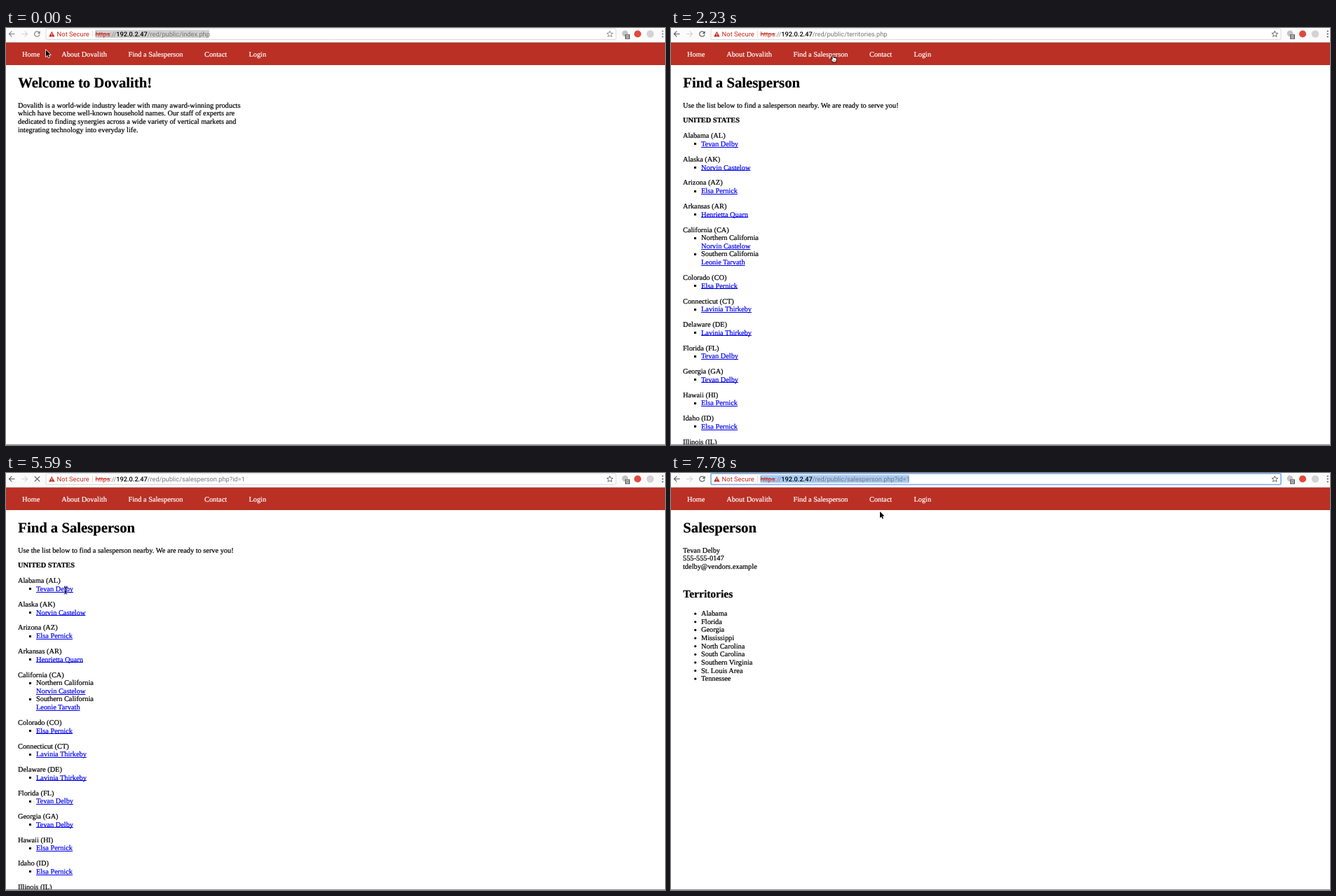
Write an HTML page with a canvas that moves like this. It is 940x596 px and loops after 7.99 s.

```html
<!DOCTYPE html>
<html lang="en">
<head>
<meta charset="utf-8">
<title>Sales directory</title>
<style>
  html, body { margin: 0; width: 100%; height: 100%; overflow: hidden; background: #fff; }
  canvas { display: block; }
</style>
</head>
<body>
<canvas id="stage" width="940" height="596"></canvas>
<script>
const ctx = document.getElementById('stage').getContext('2d');
const LOOP = 7990, LINE = 11.62, EM = 10.35, GAP = 10.3;
const SERIF = '"Liberation Serif", serif', SANS = 'Roboto, sans-serif';
const COMPANY = 'Dovalith', HOST = '192.0.2.47';
const [TEVAN, NORVIN, ELSA, HENRIETTA, LEONIE, LAVINIA] = ['Tevan Delby', 'Norvin Castelow',
  'Elsa Pernick', 'Henrietta Quarn', 'Leonie Tarvath', 'Lavinia Thirkeby'];

const STATES = [
  ['Alabama (AL)', TEVAN], ['Alaska (AK)', NORVIN], ['Arizona (AZ)', ELSA], ['Arkansas (AR)', HENRIETTA],
  ['California (CA)', ['Northern California', NORVIN], ['Southern California', LEONIE]],
  ['Colorado (CO)', ELSA], ['Connecticut (CT)', LAVINIA], ['Delaware (DE)', LAVINIA],
  ['Florida (FL)', TEVAN], ['Georgia (GA)', TEVAN], ['Hawaii (HI)', ELSA], ['Idaho (ID)', ELSA],
  ['Illinois (IL)']
];
const TERRITORIES = ['Alabama', 'Florida', 'Georgia', 'Mississippi', 'North Carolina', 'South Carolina',
  'Southern Virginia', 'St. Louis Area', 'Tennessee'];

// Each track holds its value until the next time.
const PAGES = [[0, drawHome], [2230, drawDirectory], [5860, drawPerson]];
const PATHS = [[0, 'index.php'], [1900, 'territories.php'], [5330, 'salesperson.php?id=1']];
const LOADING = [[0, false], [1900, true], [2230, false], [5330, true], [5860, false]];
const ADDRESS = [[0, 'inactive'], [1420, 'focused'], [1660, 'plain'], [7360, 'focused']];
const POINTER = [
  [0, arrow, 57, 31.5], [170, hand, 47, 38.5], [500, hand, 140, 35], [710, hand, 235, 43], [980, hand, 235, 38.5],
  [1420, hand, 231, 38.5], [2490, hand, 230, 38.5],
  [3030, hand, 240, 36], [3220, arrow, 272, 24], [3410, beam, 312, 8.5], [3600, beam, 306, 10], [3800, arrow, 299, 19],
  [4100, arrow, 190, 95], [4280, hand, 92, 167.5], [4490, hand, 90, 168], [4690, hand, 87, 168],
  [4890, hand, 86, 168], [5090, hand, 85, 168], [5590, beam, 85, 168],
  [6080, arrow, 150, 165], [6300, arrow, 240, 160], [6510, arrow, 330, 152], [6730, arrow, 371, 147],
  [7120, beam, 375, 11], [7570, arrow, 330, 35], [7780, arrow, 298, 55]
];
const at = (track, t) => track.findLast(key => key[0] <= t);

function text(string, x, y, { size = EM, color = '#000', weight = 400, family = SERIF } = {}) {
  ctx.font = `${weight} ${size}px ${family}`;
  ctx.fillStyle = ctx.strokeStyle = color;
  ctx.fillText(string, x, y);
  if (family === SERIF) { // slightly heavier page type
    ctx.lineWidth = 0.22;
    ctx.strokeText(string, x, y);
  }
  return ctx.measureText(string).width;
}
function rect(x, y, w, h, color) {
  ctx.fillStyle = color;
  ctx.fillRect(x, y, w, h);
}
function disc(x, y, r, color) {
  ctx.fillStyle = color;
  ctx.beginPath();
  ctx.arc(x, y, r, 0, 7);
  ctx.fill();
}
function stroke(path, color, width = 1) {
  ctx.strokeStyle = color;
  ctx.lineWidth = width;
  ctx.stroke(new Path2D(path));
}
function fill(path, color) {
  ctx.fillStyle = color;
  ctx.fill(new Path2D(path));
}

function lines(list, y) {
  list.forEach((line, i) => text(line, 17, y + i * LINE));
}
function heading(string, y = 85, size = EM * 2) {
  text(string, 17.3, y, { size, weight: 700 });
}
function link(name, y) {
  const color = '#0000ee', width = text(name, 43, y, { color });
  rect(43, Math.round(y + 0.7), width, 1, color);
}

function drawHome() {
  heading(`Welcome to ${COMPANY}!`);
  lines([`${COMPANY} is a world-wide industry leader with many award-winning products`,
    'which have become well-known household names. Our staff of experts are',
    'dedicated to finding synergies across a wide variety of vertical markets and',
    'integrating technology into everyday life.'], 113.7);
}

function drawDirectory() {
  heading('Find a Salesperson');
  lines(['Use the list below to find a salesperson nearby. We are ready to serve you!'], 113.7);
  text('UNITED STATES', 17, 135.4, { weight: 700 });
  let y = 157.4;
  for (const [state, ...entries] of STATES) {
    text(state, 17, y);
    for (const entry of entries) {
      y += LINE;
      rect(33, Math.round(y - 4.6), 3, 3, '#000');
      if (Array.isArray(entry)) {
        text(entry[0], 43, y);
        y += LINE;
        link(entry[1], y);
      } else link(entry, y);
    }
    y += LINE + GAP;
  }
}

function drawPerson() {
  heading('Salesperson');
  lines([TEVAN, '555-555-0147', 'tdelby@vendors.example'], 113.7);
  heading('Territories', 178, EM * 1.5);
  TERRITORIES.forEach((name, i) => {
    const y = 204.2 + i * LINE;
    disc(34.7, y - 3, 1.6, '#000');
    text(name, 43, y);
  });
}

function drawNav() {
  rect(0, 21, 940, 32, '#ba3025');
  [['Home', 23], [`About ${COMPANY}`, 79.2], ['Find a Salesperson', 174.4], ['Contact', 283], ['Login', 346.4]]
    .forEach(([label, x]) => text(label, x, 41, { color: '#fff' }));
}

function drawToolbar(mode, file, loading) {
  const icon = mode === 'inactive' ? '#808080' : '#5a5a5a', red = '#c5281c';
  rect(0, 0, 940, 20, '#fbfbfb');
  rect(0, 20, 940, 1, '#c4b0ae');
  stroke('M12.5 8.5H4.5M8.3 4.6L4.4 8.5L8.3 12.4', icon, 1.1);
  stroke('M22 8.5H30.5M26.7 4.6L30.6 8.5L26.7 12.4', '#d2d2d2', 1.1);
  if (loading) stroke('M40.8 4.8L48.2 12.2M48.2 4.8L40.8 12.2', icon, 1.2);
  else {
    stroke('M47.3 6.2A3.7 3.7 0 1 0 48 9.3', icon, 1.2);
    fill('M48.6 4.2V8.2H44.6Z', icon);
  }

  const focused = mode === 'focused';
  ctx.beginPath();
  ctx.roundRect(57, 0.8, 813, 15.7, 1.5);
  ctx.fillStyle = '#fff';
  ctx.fill();
  ctx.strokeStyle = focused ? '#78aaea' : '#d6d6d6';
  ctx.lineWidth = focused ? 1.6 : 0.9;
  ctx.stroke();

  fill('M65.3 4.8L69.5 12.6H61.1Z', red);
  rect(64.8, 7.4, 1, 2.6, '#fff');
  rect(64.8, 10.7, 1, 1, '#fff');
  text('Not Secure', 72.6, 12, { size: 9.4, color: red, family: SANS });
  rect(123.2, 3.5, 0.8, 10, '#d5d5d5');
  drawAddress(mode, file, red);

  const star = Array.from({ length: 10 }, (_, i) => {
    const r = i % 2 ? 2 : 4.6, a = i * Math.PI / 5;
    return `${861.3 + r * Math.sin(a)} ${8.8 - r * Math.cos(a)}`;
  });
  stroke(`M${star.join('L')}Z`, icon, 0.9);

  disc(883, 7.8, 4.4, '#c4c4c4');
  rect(883, 9, 7, 7, '#777');
  text('0', 884.5, 15, { size: 7, color: '#fff', family: SANS });
  disc(901, 8.5, 5, '#e2493d');
  disc(919, 8.5, 5.2, '#d3d3d3');
  [4.5, 8.5, 12.5].forEach(y => disc(936.7, y, 1.1, icon));
}

function drawAddress(mode, file, red) {
  const size = 9.23, left = 127.4, gray = '#777';
  const parts = [['https', red], ['://', gray], [HOST, '#000', 500], [`/red/public/${file}`, gray]];
  if (mode !== 'plain') {
    ctx.font = `${size}px ${SANS}`;
    const width = ctx.measureText(parts.map(part => part[0]).join('')).width;
    rect(left, 2.8, width, 11.4, mode === 'focused' ? '#a9cdf7' : '#d0d0d0');
  }
  let x = left;
  for (const [string, color, weight] of parts) {
    const width = text(string, x, 12, { size, color, weight, family: SANS });
    if (string === 'https') rect(x, 8.3, width, 0.9, red);
    x += width;
  }
}

function arrow() {
  const shape = 'M0 0V9.2L2.1 7.3L3.5 10.6L5 9.9L3.6 6.8L6.4 6.6Z';
  stroke(shape, '#fff', 1.4);
  fill(shape, '#000');
}
function hand() {
  const shape = 'M-1 6.6V1Q0 -.5 1 1V4Q2 3.2 2.8 4.2Q4 3.6 4.3 4.8Q5.2 4.6 5.2 5.8V7.6L4.2 9.4V10.6H-.6V9.6'
    + 'L-2.9 6.8Q-3 5.3 -1.8 5.8Z';
  fill(shape, '#fff');
  stroke(shape, '#000', 0.9);
  stroke('M.9 7V9M2.4 7V9', '#000', 0.5);
}
function beam() {
  stroke('M-2.4 -4.8Q0 -4.8 0 -3.4Q0 -4.8 2.4 -4.8M0 -3.6V3.6M-2.4 4.8Q0 4.8 0 3.4Q0 4.8 2.4 4.8M-1.4 1.4H1.4',
    '#000', 1);
}

function draw() {
  const t = performance.now() % LOOP;
  ctx.textRendering = 'geometricPrecision';
  rect(0, 0, 940, 596, '#fff');
  at(PAGES, t)[1]();
  drawNav();
  drawToolbar(at(ADDRESS, t)[1], at(PATHS, t)[1], at(LOADING, t)[1]);
  rect(0, 595, 940, 1, '#8c8c8c');
  const [, pointer, x, y] = at(POINTER, t);
  ctx.save();
  ctx.translate(x, y);
  pointer();
  ctx.restore();
  requestAnimationFrame(draw);
}
draw();
</script>
</body>
</html>
```
